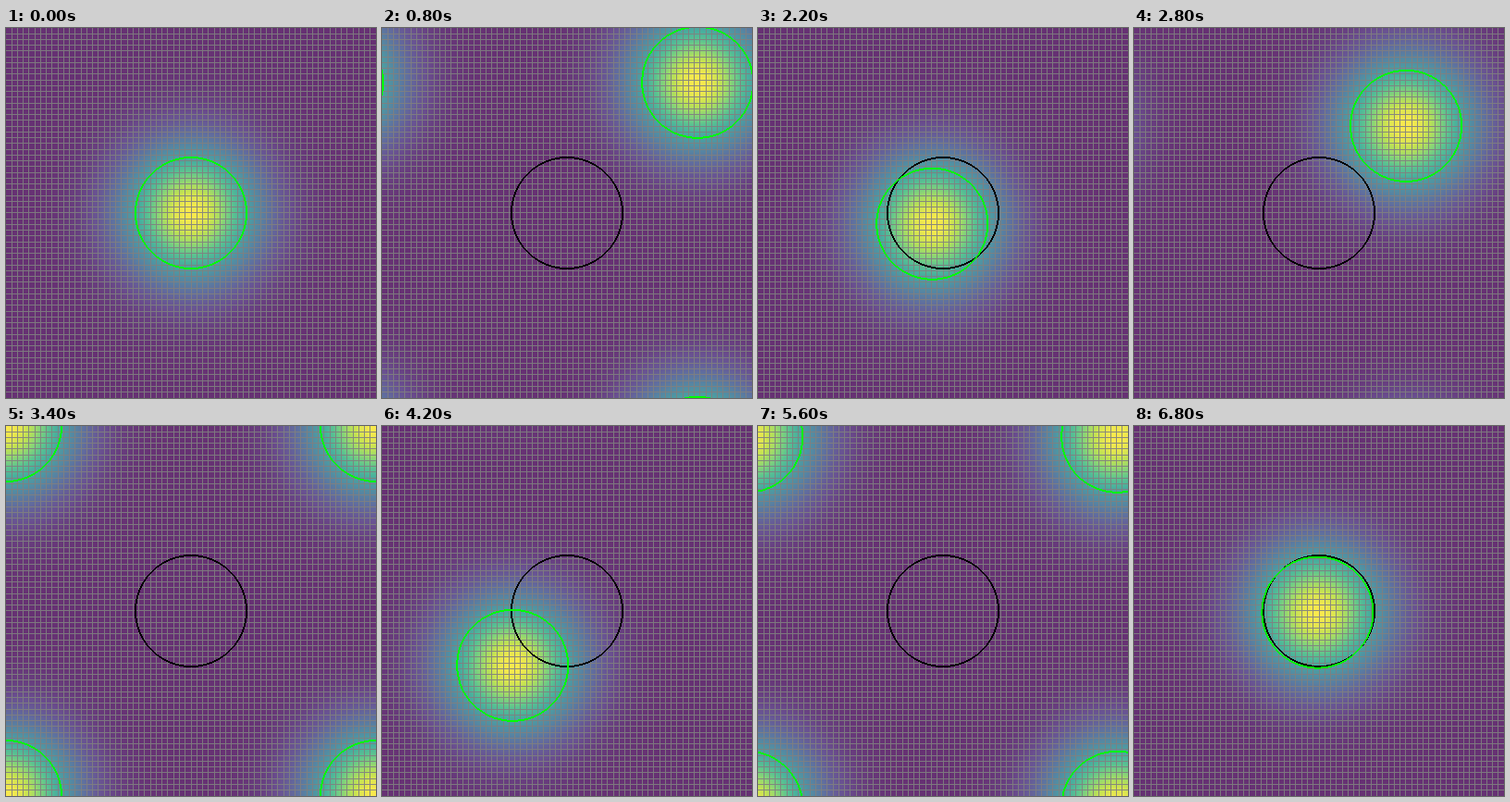
An HTML page with a canvas that plays this animation: 400x400 px, repeating every 8 s.

```html
<!DOCTYPE html>
<html lang="en">
<head>
<meta charset="utf-8">
<title>Periodic advection</title>
<style>
  html, body { margin: 0; width: 100%; height: 100%; overflow: hidden; }
  canvas { display: block; width: 400px; height: 400px; }
</style>
</head>
<body>
<canvas id="stage" width="400" height="400"></canvas>
<script>
const SIZE = 400, MID = SIZE / 2, CELLS = 64, RADIUS = 60;
const STEP_MS = 200, LAST_STEP = 34, LOOP_MS = 8000;
const SPEED = 600 / 17;     // pixels per step, right and up
const MAX_TRAVEL = 1198.4;  // the run stops just short of three laps
const ctx = document.getElementById('stage').getContext('2d');
const image = ctx.createImageData(SIZE, SIZE);

// Viridis colour stops, softened towards white
const stops = [
  [68, 1, 84], [72, 40, 120], [62, 74, 137], [49, 104, 142], [38, 130, 142],
  [31, 158, 137], [53, 183, 121], [109, 205, 89], [180, 222, 44], [253, 231, 37]
];
const palette = Array.from({ length: 256 }, (_, i) => {
  const p = i / 255 * (stops.length - 1);
  const k = Math.min(Math.floor(p), stops.length - 2);
  return stops[k].map((c, j) => 0.8 * (c + (stops[k + 1][j] - c) * (p - k)) + 48);
});

const wrap = v => ((v % SIZE) + SIZE) % SIZE;

// One-dimensional periodic bell curve, half height at RADIUS
function bell(center) {
  return Array.from({ length: SIZE }, (_, i) => {
    const d = Math.abs(i + 0.5 - center);
    const r = Math.min(d, SIZE - d) / RADIUS;
    return Math.pow(2, -r * r);
  });
}

function drawField(cx, cy) {
  const gx = bell(cx), gy = bell(cy);
  let o = 0;
  for (let y = 0; y < SIZE; y++) {
    for (let x = 0; x < SIZE; x++, o += 4) {
      const c = palette[Math.round(255 * gx[x] * gy[y])];
      image.data[o] = c[0];
      image.data[o + 1] = c[1];
      image.data[o + 2] = c[2];
      image.data[o + 3] = 255;
    }
  }
  ctx.putImageData(image, 0, 0);
}

// Lines on a pixel boundary fall outwards in x and upwards in y
function drawGrid() {
  ctx.fillStyle = 'rgba(128, 128, 128, 0.9)';
  ctx.beginPath();
  for (let i = 0; i < CELLS; i++) {
    const p = i * SIZE / CELLS;
    ctx.rect(Math.floor(p + (p - MID) * 1e-5), 0, 1, SIZE);
    ctx.rect(0, Math.floor(p - 1e-3), SIZE, 1);
  }
  ctx.fill();
}

// Hard-edged ring, two pixels wide along the minor axis, wrapped at the borders
function ring(cx, cy, color) {
  ctx.fillStyle = color;
  const reach = RADIUS + 2;
  for (let y = Math.floor(cy - reach); y <= cy + reach; y++) {
    for (let x = Math.floor(cx - reach); x <= cx + reach; x++) {
      const dx = x + 0.5 - cx, dy = y + 0.5 - cy;
      const d = Math.hypot(dx, dy);
      if (Math.abs(d - RADIUS) * d < Math.max(Math.abs(dx), Math.abs(dy)))
        ctx.fillRect(wrap(x), wrap(y), 1, 1);
    }
  }
}

function draw(step) {
  const travel = Math.min(SPEED * step, MAX_TRAVEL);
  const cx = wrap(MID + travel), cy = wrap(MID - travel);
  drawField(cx, cy);
  drawGrid();
  ring(MID, MID, '#000');
  ring(cx, cy, '#0f0');
}

let shown = -1;
function tick() {
  const step = Math.min(Math.floor(performance.now() % LOOP_MS / STEP_MS), LAST_STEP);
  if (step !== shown) draw(shown = step);
  requestAnimationFrame(tick);
}
tick();
</script>
</body>
</html>
```
